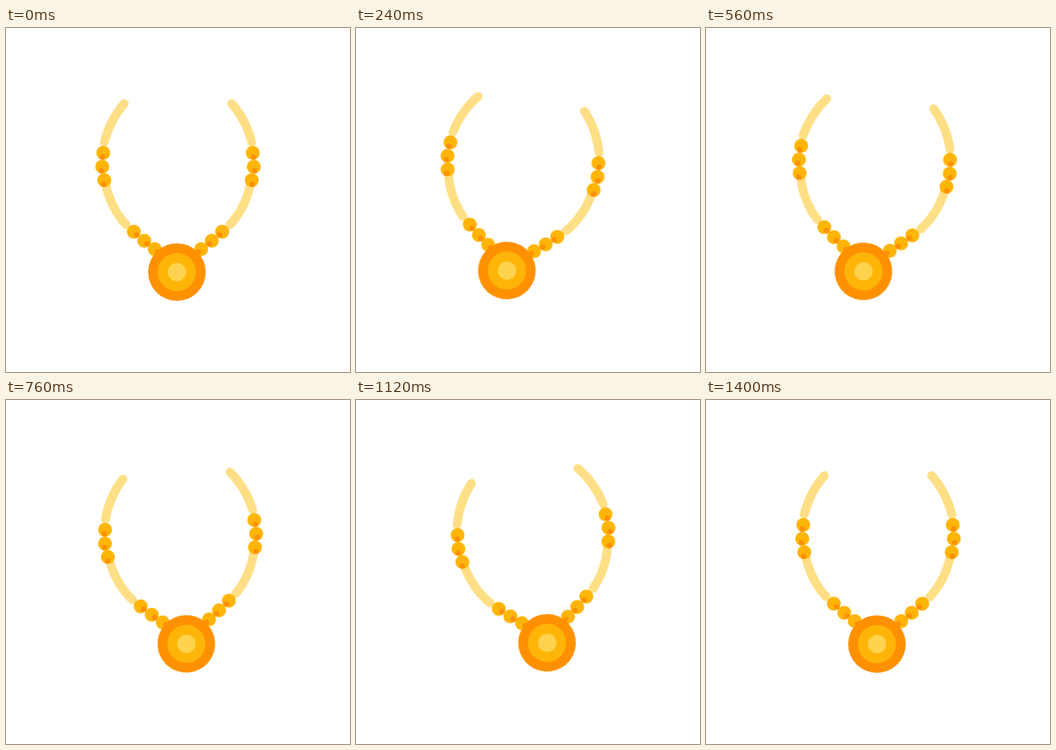
Recreate the animation shown at these times as an HTML page. Size 504x504 px, loop 1.44 s.

```html
<!DOCTYPE html>
<html lang="en">
<head>
<meta charset="utf-8">
<title>Swinging necklace</title>
<style>
  html, body { margin: 0; width: 100%; height: 100%; overflow: hidden; background: #fff; }
  svg { display: block; width: 100%; height: 100%; }
  .chain { fill: none; stroke: #ffdf85; stroke-width: 13; stroke-linecap: round; }
  .gold { fill: #ffb508; }
  .deep { fill: #ff9100; }
  .pale { fill: #ffd34d; }
  .swing {
    transform-origin: 252px 145.5px;
    animation: swing 1440ms cubic-bezier(.333, 0, .667, 1) infinite;
  }
  @keyframes swing {
    0%, 97.22%, 100% { transform: rotate(0deg); }
    17.36%, 30% { transform: rotate(8deg); }
    64.58%, 79.86% { transform: rotate(-8deg); }
  }
</style>
</head>
<body>
<svg viewBox="0 0 504 504">
  <g class="swing">
    <g id="side">
      <path class="chain" d="M173.3 110.8Q152.5 134.5 144 167.5M146 229Q153.5 264 175.8 288"/>
      <g class="gold">
        <circle cx="142.5" cy="183" r="10.2"/>
        <circle cx="141" cy="203.3" r="10.2"/>
        <circle cx="144" cy="223" r="10.2"/>
        <circle cx="187.3" cy="298.5" r="10.2"/>
        <circle cx="202.6" cy="311.8" r="10.2"/>
        <circle cx="218" cy="324" r="10.2"/>
      </g>
      <g class="deep">
        <circle cx="141" cy="189" r="4"/>
        <circle cx="139.8" cy="209" r="4"/>
        <circle cx="143" cy="229" r="4"/>
        <circle cx="191.2" cy="303" r="4"/>
        <circle cx="206.3" cy="316.2" r="4"/>
        <circle cx="222" cy="328" r="4"/>
      </g>
    </g>
    <use href="#side" transform="matrix(-1 0 0 1 504 0)"/>
    <circle class="deep" cx="250.4" cy="357.6" r="42.2"/>
    <circle class="gold" cx="250.4" cy="357.6" r="27.9"/>
    <circle class="pale" cx="250.6" cy="357.6" r="13.4"/>
  </g>
</svg>
</body>
</html>
```
